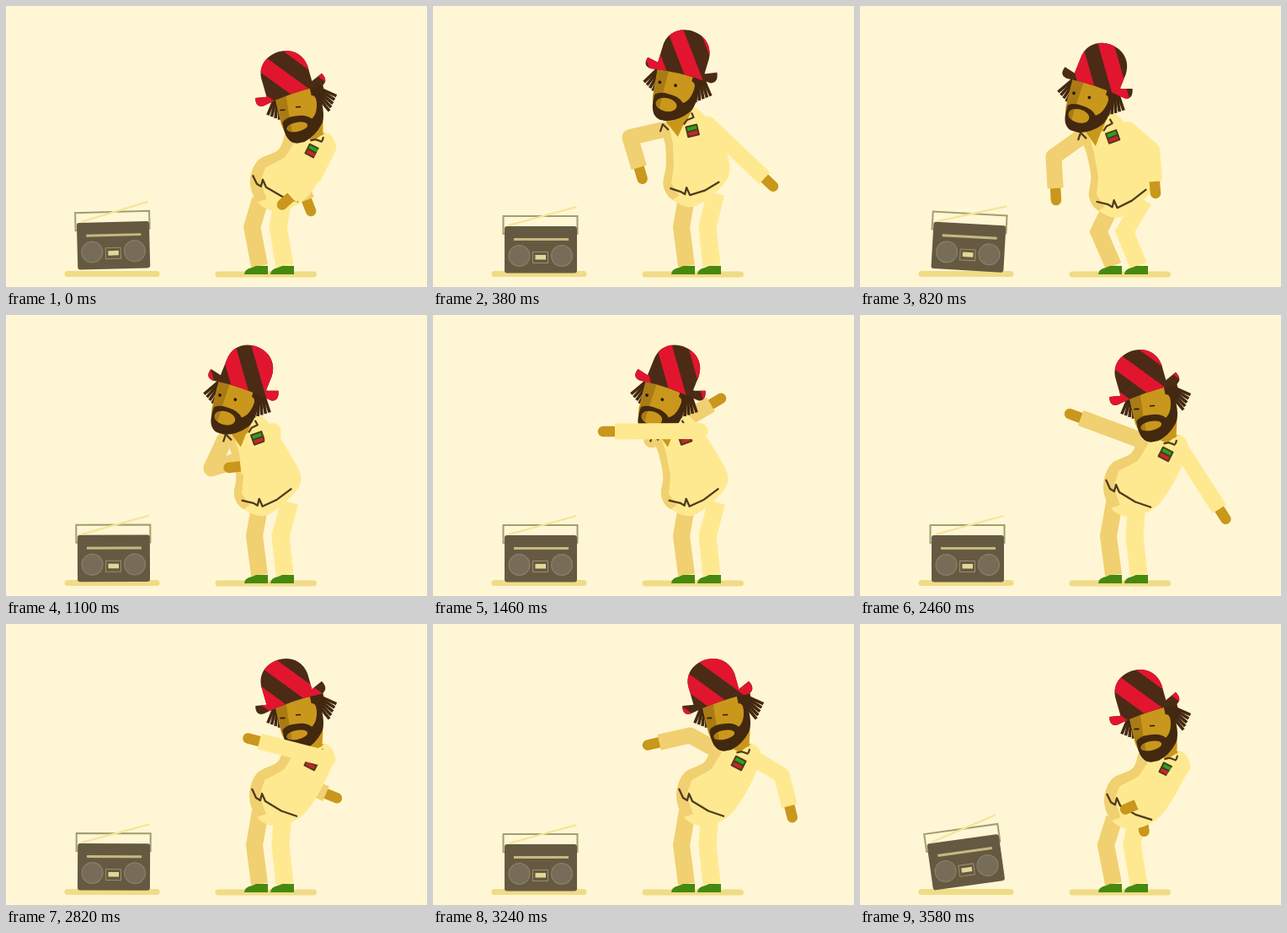
An HTML page with a canvas that plays this animation: 500x333 px, repeating every 3600 ms.

```html
<!DOCTYPE html>
<html lang="en">
<head>
<meta charset="utf-8">
<title>Dance</title>
<style>
html, body { margin: 0; width: 100%; height: 100%; overflow: hidden; background: #fff6d5; }
canvas { display: block; }
</style>
</head>
<body>
<canvas id="stage" width="500" height="333"></canvas>
<script>
const LOOP = 3600, BEAT = 900;
const c = document.getElementById('stage').getContext('2d');
const INK = '#4f3a1e', HAIR = '#432810', SKIN = '#c9971b', SHADE = '#aa7b14';
const LIGHT = '#ffe990', MID = '#f0d070', FLOOR = '#f0dc86';

// wrist paths: time, x, y
const FRONT = [
  [0, 338, 226], [160, 378, 225], [540, 398, 192], [820, 350, 208], [1460, 216, 138],
  [1880, 335, 205], [2200, 456, 190], [2460, 427, 230], [2820, 301, 139],
  [3260, 424, 216], [3580, 328, 214]
];
const BACK = [
  [0, 357, 230], [540, 215, 185], [820, 232, 216], [1460, 330, 106], [1880, 212, 202],
  [2460, 262, 122], [2820, 380, 201], [3260, 268, 140], [3580, 335, 232]
];
// torso outline leaning left and right, from the nape down the back
const TORSO_L = [[268, 140], [274, 165], [276, 190], [273, 213], [284, 230],
  [312, 237], [350, 203], [343, 165], [312, 122], [290, 130]];
const TORSO_R = [[333, 146], [322, 164], [298, 177], [289, 203], [298, 229],
  [322, 239], [357, 222], [388, 165], [382, 143], [358, 145]];

const rad = a => a * Math.PI / 180;
const mix = (a, b, k) => a + (b - a) * k;
const clamp = x => Math.min(1, Math.max(0, x));
const ease = x => clamp(x) ** 2 * (3 - 2 * clamp(x));

// looped cubic without overshoot
function at(keys, t) {
  const n = keys.length;
  const key = i => keys[(i + n) % n];
  const time = i => key(i)[0] + Math.floor(i / n) * LOOP;
  let i = n - 1;
  while (keys[i][0] > t) i--;
  const h = time(i + 1) - time(i), u = (t - time(i)) / h, v = 1 - u;
  return [1, 2].map(j => {
    const slope = m => (key(m + 1)[j] - key(m)[j]) / (time(m + 1) - time(m));
    const bend = m => {
      const p = slope(m - 1), q = slope(m);
      return p * q > 0 ? 2 * p * q / (p + q) : 0;
    };
    return key(i)[j] * v * v * (1 + 2 * u) + key(i + 1)[j] * u * u * (3 - 2 * u)
      + h * u * v * (bend(i) * v - bend(i + 1) * u);
  });
}

function line(pts, color, width, cap = 'butt', join = 'round') {
  c.beginPath();
  pts.forEach(p => c.lineTo(...p));
  c.strokeStyle = color;
  c.lineWidth = width;
  c.lineCap = cap;
  c.lineJoin = join;
  c.stroke();
}

function fill(path, color) {
  c.fillStyle = color;
  c.fill(new Path2D(path));
}

function dot(x, y, rx, ry, color) {
  c.beginPath();
  c.ellipse(x, y, rx, ry, 0, 0, 7);
  c.fillStyle = color;
  c.fill();
}

function box(x, y, w, h, r, color) {
  c.beginPath();
  c.roundRect(x, y, w, h, r);
  c.fillStyle = color;
  c.fill();
}

// smooth closed curve through points
function blob(pts) {
  const n = pts.length, p = i => pts[(i + n) % n];
  const path = new Path2D();
  path.moveTo(...pts[0]);
  for (let i = 0; i < n; i++) {
    const [a, b, d, e] = [p(i - 1), p(i), p(i + 1), p(i + 2)];
    path.bezierCurveTo(b[0] + (d[0] - a[0]) / 6, b[1] + (d[1] - a[1]) / 6,
      d[0] - (e[0] - b[0]) / 6, d[1] - (e[1] - b[1]) / 6, ...d);
  }
  return path;
}

function group(x, y, angle, draw) {
  c.save();
  c.translate(x, y);
  c.rotate(rad(angle));
  draw();
  c.restore();
}

function radio(t) {
  const d = (t + 200) % BEAT - 178;
  const tilt = -8.5 * Math.exp(-Math.abs(d) / 60) * Math.cos(d * 2 * Math.PI / 110);
  const lift = 7 * Math.exp(-Math.abs(d) / 70);
  group(128 - tilt * .2, 316 - lift, tilt, () => {
    c.translate(-128, -316);
    line([[86, 270], [83.5, 270], [83.5, 249], [171.5, 249], [171.5, 270], [169, 270]], '#a09f6e', 2, 'butt', 'miter');
    box(85, 261, 86, 55.5, 3, '#655a41');
    line([[90, 260], [170.5, 238]], '#f5e596', 2.2);
    line([[96, 276.5], [161, 276.5]], '#c5b982', 3);
    for (const x of [102.5, 153]) {
      dot(x, 296, 13, 13, '#8b806a');
      dot(x, 296, 11.8, 11.8, '#776c57');
    }
    c.strokeStyle = '#9a8f70';
    c.lineWidth = 1;
    c.strokeRect(118.5, 291.5, 18, 13);
    box(121.5, 295, 12.5, 5.5, 0, '#e3d797');
  });
}

// the elbow bends outwards when the wrist comes close
function arm([sx, sy], [wx, wy], side, color) {
  const dx = wx - sx, dy = wy - sy, reach = Math.hypot(dx, dy);
  const out = side * Math.sqrt(Math.max(0, 37.5 ** 2 - reach * reach / 4)) / reach;
  const ex = (sx + wx) / 2 + dy * out, ey = (sy + wy) / 2 - dx * out;
  const fore = Math.hypot(wx - ex, wy - ey);
  const ux = (wx - ex) / fore, uy = (wy - ey) / fore;
  line([[wx - ux * 4, wy - uy * 4], [wx + ux * 14, wy + uy * 14]], SKIN, 12.5, 'round');
  dot(sx, sy, 9.5, 9.5, color);
  line([[sx, sy], [ex, ey], [wx, wy]], color, 19);
}

function dreads(side, turn) {
  group(side * 26, 7, turn, () => {
    for (let i = 0; i < 5; i++) {
      line([[side * (i * 2 - 6), -5], [side * (i * 4.1 - 2), 24 - i * 2.7]], HAIR, 3.6);
    }
  });
}

function face(k) {
  const mouth = color => dot(-9, 41, 12.5, 8 - 2.5 * k, color);
  dreads(-1, 0);
  dreads(1, -20 * k);
  fill('M-28 -6H25L24 34Q12 56-9 56Q-25 52-27 34Z', SKIN);
  fill('M-28 -6H-14L-16 34L-26 36Z', SHADE);
  fill('M15 -4H31Q32 10 25 17H20Q20 8 15 8Z', HAIR);
  fill('M-25 32Q-19 27-9 28Q4 28 10 35Q19 30 20 12H25Q27 35 20 44Q10 56-4 60H-13Q-27 57-25 32Z', HAIR);
  mouth(SKIN);
  c.save();
  c.beginPath();
  c.rect(-25, 30, 9, 25);
  c.clip();
  mouth(SHADE);
  c.restore();
  for (const x of [-22, -3]) {
    if (k < .5) dot(x, 16.5, 1.9, 1.9, '#2d1a0a');
    else line([[x - 3, 17.5], [x + 3, 18.5]], '#2d1a0a', 1.6);
  }
}

function hat(t, tilt) {
  const stripe = 18;
  c.clip(new Path2D('M-42-8L-29-5L-28-24C-28-60 28-60 29-24L28-5L42-10Q47 1 38 4Q0-1-36 4Q-46 3-42-8Z'));
  c.fillStyle = '#4b2b15';
  c.fillRect(-60, -60, 120, 80);
  c.translate(0, -22);
  c.rotate(rad(-35));
  c.fillStyle = '#e2152f';
  const shift = (9 - tilt * .2 + t / 1200 * 2 * stripe) % (2 * stripe);
  for (let i = -4; i < 3; i++) c.fillRect(shift + stripe * (2 * i + .5), -70, stripe, 140);
}

function dancer(t) {
  const lean = mix(1, -.12, ease((t - 60) / 420) - ease((t - 1800) / 400));
  const beat = (t + 240) % BEAT;
  const dip = ease(beat / 180) - ease((beat - 220) / 120);
  const rise = 24 * Math.max(0, lean * (1 - lean));
  const place = (l, r) => {
    const y = mix(l[1], r[1], lean);
    const low = clamp((y - 140) / 90);
    return [mix(l[0], r[0], lean) + dip,
      y + mix(9 * dip - rise, mix(12, 4, lean) * dip - rise / 3, low)];
  };
  const move = ([x, y], dx, dy) => [x + dx, y + dy];

  const kx = 295 - dip * mix(11, 3, lean), ky = 262 + 5 * dip * (1 - lean);
  const hip = 222 + 8 * dip;
  line([[302, hip], [kx, ky], [301, 308]], MID, 20, 'butt', 'miter');
  line([[mix(336, 329, lean), hip], [kx + 31, ky], [331, 308]], LIGHT, 21, 'butt', 'miter');
  for (const x of [283, 314]) {
    fill(`M${x} 318Q${x} 312 ${x + 9} 310L${x + 14} 308H${x + 28}V318Z`, '#46890f');
  }

  arm(place([268, 148], [338, 150]), at(BACK, t), -1, MID);

  const outline = TORSO_L.map((p, i) => place(p, TORSO_R[i]));
  const torso = blob(outline);
  c.save();
  c.fillStyle = LIGHT;
  c.fill(torso);
  c.clip(torso);
  line(outline.slice(0, 5), MID, mix(18, 23, lean));
  c.restore();

  const notch = place([299, 224], [302, 209]), end = place([340, 208], [346, 228]);
  const sag = [(notch[0] + end[0]) / 2 + 3, (notch[1] + end[1]) / 2 + 3];
  line([place([281, 217], [292, 195]), move(notch, -5, -3), notch,
    move(notch, 2, -8), move(notch, 6, 1), sag, end], INK, 2.3);

  const hx = 291 + 82.5 * lean - 35 * lean * lean;
  const hy = 80 - 39 * lean + 50 * lean * lean + mix(9, 13, lean) * dip;
  const tilt = 15 - 34 * lean, turn = tilt * .72 + 2;
  const cs = Math.cos(rad(turn)), sn = Math.sin(rad(turn));
  const nx = 14 + 8 * lean, ny = 35;
  line([[hx + nx * cs - ny * sn, hy + nx * sn + ny * cs], place([287, 138], [366, 145])], SKIN, 19);
  const chest = [place([274, 138], [352, 146]), place([288, 156], [364, 152]), place([299, 131], [378, 142])];
  fill('M' + chest.join('L') + 'Z', SKIN);
  const collar = place([270, 141], [345, 138]);
  line([move(collar, -3, 9), collar, move(collar, 7, 7)], INK, 2.2);

  group(...place([306, 148], [363, 165]), mix(-15, 27, lean), () => {
    line([[-8, -10], [-3, -14], [5, -15], [4, -21]], INK, 2.2);
    box(-7.5, -7, 15, 14, 1, INK);
    box(-5.5, -5, 11, 4, 0, '#27a51d');
    box(-5.5, 1, 11, 4, 0, '#c9252a');
  });

  group(hx, hy, turn, () => {
    c.translate(8 * lean, 0);
    face(clamp(lean));
  });
  group(hx, hy, tilt, () => hat(t, tilt));
  arm(place([324, 140], [382, 160]), at(FRONT, t), 1, LIGHT);
}

function frame() {
  const t = performance.now() % LOOP;
  c.fillStyle = '#fff6d5';
  c.fillRect(0, 0, 500, 333);
  box(69.5, 314, 113, 7, 3.5, FLOOR);
  box(248.5, 314.5, 120.5, 7, 3.5, FLOOR);
  radio(t);
  dancer(t);
  requestAnimationFrame(frame);
}
frame();
</script>
</body>
</html>
```
